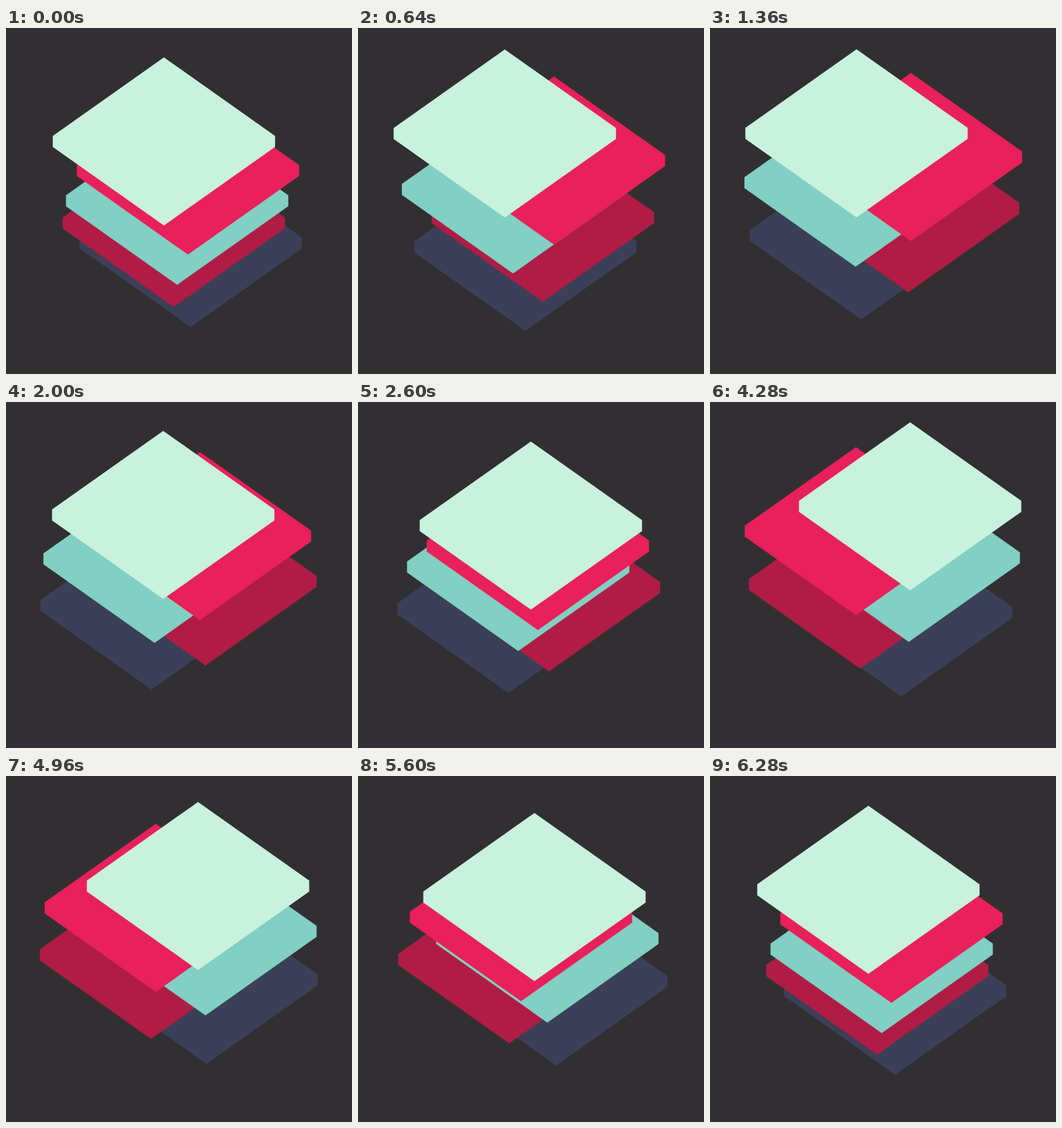
An HTML page for the animation above (6.32 s loop, 512 by 512 pixels).

```html
<!DOCTYPE html>
<html lang="en">
<head>
<meta charset="utf-8">
<title>Swaying stack</title>
<style>
  html, body { margin: 0; width: 100%; height: 100%; overflow: hidden; background: #322f32; }
  svg { display: block; width: 100%; height: 100%; }
</style>
</head>
<body>
<svg id="stage" viewBox="0 0 512 512"></svg>
<script>
  const LOOP = 6320;      // ms until the motion restarts
  const STEP = 40;        // ms per picture
  const PERIOD = 6300;    // ms per full sway
  const LAG = 246;        // ms each plate trails the one above
  const FIRST_CROSS = 2590;
  const SWAY = 41;
  const SLOPE = 0.707;
  const HALF = 164.5;     // half the plate width
  const EDGE = 16.2;      // height of the vertical side

  // Top to bottom: colour, resting x, resting y of the lowest corner
  const plates = [
    ["#c8f1de", 255.4, 307.6],
    ["#e8205b", 256.6, 344.2],
    ["#82cfc3", 256.0, 382.0],
    ["#b01c45", 255.4, 418.0],
    ["#3b3f58", 256.5, 454.5]
  ].map(([color, x, y], i) => ({ color, x, y, i }));

  const rise = HALF * SLOPE;
  const outline = [
    [0, 0], [HALF, -rise], [HALF, -rise - EDGE],
    [0, -2 * rise - EDGE], [-HALF, -rise - EDGE], [-HALF, -rise]
  ].join(" ");

  const stage = document.getElementById("stage");
  for (const plate of [...plates].reverse()) {
    plate.node = document.createElementNS("http://www.w3.org/2000/svg", "polygon");
    plate.node.setAttribute("points", outline);
    plate.node.setAttribute("fill", plate.color);
    stage.append(plate.node);
  }

  // Each plate slides up one diagonal, back to rest, then up the other.
  function place({ node, x, y, i }, t) {
    const side = i % 2 ? -1 : 1;
    const phase = 2 * Math.PI * (t - FIRST_CROSS - i * LAG) / PERIOD;
    const dx = side * SWAY * Math.sin(phase);
    const dy = -SLOPE * Math.abs(dx);
    node.setAttribute("transform", `translate(${x + dx} ${y + dy})`);
  }

  const start = performance.now();
  function draw() {
    const elapsed = (performance.now() - start) % LOOP;
    const t = Math.floor(elapsed / STEP) * STEP;
    plates.forEach(plate => place(plate, t));
    requestAnimationFrame(draw);
  }
  draw();
</script>
</body>
</html>
```
